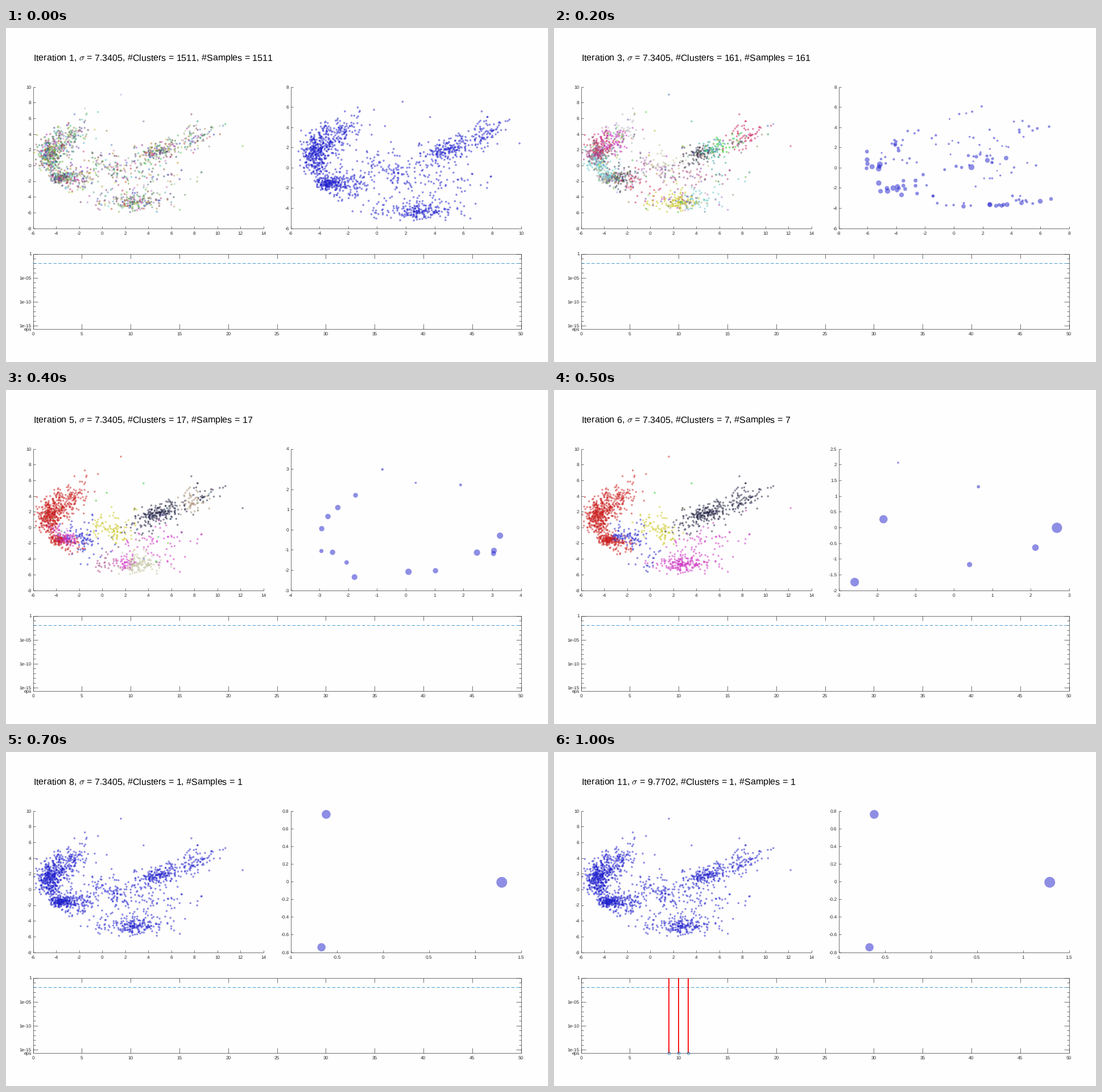
These frames come from a looping animation (953 px wide and 588 px high, 1100 ms). A matplotlib script:

```python
import numpy as np
import matplotlib.pyplot as plt
from matplotlib.animation import FuncAnimation
from matplotlib.collections import LineCollection
from matplotlib.colors import to_rgb

W, H, DPI = 953, 588, 64
PX = 72 / DPI
INK, STEEL = "#262626", "#0072bd"
BLUE, RED, GREEN, NAVY = "#1f1fcd", "#cc1f1f", "#1fcc1f", "#1f1f42"
MAGENTA, YELLOW, DARK, GREY = "#cc2bbf", "#ccc71f", "#38333d", "#b3b3bd"
CYAN, TEAL, SAND, TAN = "#66c7c7", "#33a699", "#c2c29e", "#a6876b"
LILAC, MAUVE, CRIMSON, SKY = "#b373bf", "#a64080", "#cc1f59", "#2673bf"

plt.rcParams.update({"font.family": "Liberation Sans", "mathtext.fontset": "cm",
                     "text.hinting": "none"})
rng = np.random.default_rng(11)

# Panels in pixels: left, top, right, bottom
TOP, FLOOR = 103.5, 352.5
SCORES = (47.5, TOP, 452.5, FLOOR)
CENTRES = (500.5, TOP, 905.5, FLOOR)
LOG = (47.5, 397.5, 905.5, 529.5)
DECADE = (LOG[3] - LOG[1]) / 15.65

XS, YS = (-6, 14), (-8, 10)
# Limits of the right panel
VIEWS = [((-6, 10), (-6, 8)), ((-8, 10), (-6, 6)), ((-8, 8), (-6, 8)), ((-6, 6), (-4, 6)),
         ((-4, 4), (-3, 4)), ((-3, 3), (-2, 2.5)), ((-1, 1.5), (-0.8, 0.8))]
COUNTS = [1511, 703, 161, 50, 17, 7, 3, 1]


def blob(n, cx, cy, sx, sy, slope=0.0):
    u, v = np.clip(rng.normal(size=(2, n)), -2.5, 2.5)
    return np.column_stack([cx + sx * u, cy + sy * v + slope * sx * u])


def make_cloud():
    far = [(1.63, 9), (12.2, 2.45), (10.5, 5.05), (10.7, 5.25), (-1.5, 7.25), (7.75, 6.5),
           (7.2, -3.75), (3.6, 5.6), (-2.4, 6.5), (8.6, -0.9), (0.4, 4.4)]
    pts = np.vstack([
        blob(250, -4.45, 1.5, 0.55, 0.85), blob(190, -3.8, 2.3, 0.9, 1, 0.5),
        blob(120, -2.8, 3.9, 1, 0.9, 0.3), blob(80, -4.5, 0.1, 0.5, 0.6, -0.6),
        blob(140, -3.6, -1.55, 0.45, 0.35), blob(210, -2.6, -1.8, 0.9, 0.65),
        blob(130, 4.9, 1.7, 0.8, 0.5, 0.25), blob(130, 5.2, 2, 1.8, 0.8, 0.45),
        blob(75, 8, 3.5, 0.95, 0.8, 0.4), blob(120, 2.5, -4.7, 0.9, 0.5),
        blob(120, 2.5, -4.5, 1.9, 0.7), blob(130, 0.5, -0.4, 1.4, 1.4),
        blob(105, 3.8, -1.4, 2.2, 1.2)])
    x, y = pts.T
    rim = (x > -1) | (y > -1.25 * (x + 5.6) - 0.6)
    pts = pts[rim & (x > -5.95) & (y > -6.2)]
    rng.shuffle(pts)
    return np.vstack([far, pts])[:COUNTS[0]]


cloud = make_cloud()


def hues(n):
    return 0.14 + 0.7 * rng.random((n, 3))


def regions(seeds, jitter, stray=0.0):
    """Colour every sample by the nearest seed, with blurred borders."""
    at = np.array([s[:2] for s in seeds])
    tint = np.array([to_rgb(s[2]) for s in seeds])
    p = cloud + rng.normal(0, jitter, cloud.shape)
    out = tint[((p[:, None] - at) ** 2).sum(2).argmin(1)]
    odd = rng.random(len(out)) < stray
    out[odd] = hues(odd.sum())
    return out


many = [(-3.2, 3, MAGENTA), (-4.6, 1.6, MAUVE), (-4.4, 2.4, CRIMSON), (-4.7, 0, CYAN),
        (-3.8, -1.1, CYAN), (-3.6, -1.8, GREY), (-2.3, -1.8, DARK), (-1.4, -2, CRIMSON),
        (-1.5, 4.7, GREY), (0, -0.5, LILAC), (1.2, 0.6, SAND), (1.8, -4.7, YELLOW),
        (5.3, -4.1, CYAN), (4.2, 1.4, DARK), (5.4, 2, TEAL), (6.4, 2.7, GREEN),
        (8, 3.5, CRIMSON), (4, -1.5, MAUVE)]
dozens = [(-4.4, 2, RED), (-5, 0.9, MAGENTA), (-4, 0.4, MAGENTA), (-3, 3.2, MAGENTA),
          (-3.6, 4.8, GREY), (-1.9, 4.8, SKY), (-2.6, -0.8, BLUE), (-3.7, -1.9, LILAC),
          (-1.7, -1.7, GREEN), (0.4, 1.8, SKY), (0.3, -0.5, YELLOW), (3.3, 0.8, YELLOW),
          (5.4, 2, LILAC), (7, 2.8, TAN), (10, 4.8, TEAL), (7.5, -0.4, LILAC),
          (0.2, -4.4, MAUVE), (2.6, -4.7, SAND), (4.2, -1.6, TAN)]
seven = [(-4.3, 2, RED), (-4, -1.7, RED), (-2.4, -2.5, RED), (-2, 5, RED), (1.6, 9, RED),
         (-2, -0.8, BLUE), (-0.9, -2.5, BLUE), (-2, -4.5, BLUE), (0.4, -0.6, YELLOW),
         (1.2, 1.7, YELLOW), (1.5, 5, GREEN), (3.4, 0.9, NAVY), (6, 2.4, NAVY),
         (9, 4.2, NAVY), (2.2, -4.4, MAGENTA), (5, -1.8, MAGENTA), (10, 0, MAGENTA)]
teens = seven + [(-3.2, -1.4, MAGENTA), (8, 3.6, TAN), (2.6, -4.6, SAND), (0, -4.6, MAUVE)]
three = [(-3.5, 1, BLUE), (-2, -2, BLUE), (-2, 5, BLUE), (3.2, 1.3, RED), (8, 3.6, RED),
         (1.6, -4.5, GREEN), (5, -2, GREEN)]

one = np.tile(to_rgb(BLUE), (len(cloud), 1))
tints = [hues(len(cloud)), hues(len(cloud)), regions(many, 0.55, 0.3),
         regions(dozens, 0.45, 0.08), regions(teens, 0.4, 0.03), regions(seven, 0.3),
         regions(three, 0.15), one]


def to_px(box, xs, ys, x, y):
    l, t, r, b = box
    return (l + (np.asarray(x) - xs[0]) / (xs[1] - xs[0]) * (r - l),
            b - (np.asarray(y) - ys[0]) / (ys[1] - ys[0]) * (b - t))


def samples():
    x, y = cloud.T
    px, py = to_px(CENTRES, *VIEWS[0], x - 0.00135 * x**3 + 0.15, y - 0.0034 * y**3)
    return np.column_stack([px, py, np.full(len(px), 1.8)])


def merged():
    x, y = cloud[11:11 + COUNTS[1]].T
    fall = np.where(x < 0, 0.7, 0.92)
    v = -fall * y - 0.1 + np.where(y < 0, 0.035 * y**2 + 0.1 * (x > 0), 0)
    px, py = to_px(CENTRES, *VIEWS[1], 0.94 * x - 0.9, np.minimum(v, 5.55))
    size = 1.6 + np.minimum(rng.exponential(0.45, len(px)), 1.5)
    return np.column_stack([px, py, size])


def trail(n, r, spread, *knots):
    """Dots of radius about r, scattered along a polyline."""
    k = np.array(knots, float)
    s = np.linspace(0, len(k) - 1, n)
    line = np.column_stack([np.interp(s, range(len(k)), c) for c in k.T])
    return np.column_stack([line + rng.normal(0, spread, (n, 2)),
                            r * rng.uniform(0.8, 1.2, n)])


def shrunk():
    big = [(734, 245, 5.2), (573, 240, 5), (762, 233, 4.2), (795, 229, 4), (855, 305, 4.3),
           (874, 301, 3.3), (822, 308, 3.9), (720, 314, 3.8), (571, 273, 4.7), (752, 138, 2)]
    return np.vstack([
        big, trail(7, 4.1, 3, (550, 222), (548, 248), (578, 244)),
        trail(9, 4, 4, (579, 287), (600, 280), (612, 286)),
        trail(6, 3, 5, (613, 266), (635, 287), (645, 264)),
        trail(5, 2.9, 2, (599, 195), (604, 217)),
        trail(7, 3.7, 2, (765, 310), (797, 312)),
        trail(9, 2.8, 6, (689, 248), (725, 232), (746, 215), (777, 234)),
        trail(4, 1.8, 2, (696, 157), (738, 148)),
        trail(12, 1.9, 8, (580, 212), (630, 180), (691, 200)),
        trail(8, 1.9, 4, (572, 232), (634, 233)),
        trail(9, 2.1, 5, (811, 168), (825, 184), (867, 169)),
        trail(12, 1.8, 7, (718, 197), (800, 206)),
        trail(12, 1.9, 9, (701, 240), (768, 227), (836, 244)),
        trail(6, 1.7, 6, (742, 272), (784, 260)),
        trail(8, 2.3, 4, (655, 283), (681, 305), (736, 310)),
        trail(8, 2.2, 3, (808, 297), (838, 311))])


def sparse():
    big = [(526, 258, 6.2), (535, 274, 6), (566, 308, 6.4), (585, 304, 5.2), (587, 319, 5),
           (545, 219, 4.8), (559, 220, 4), (515, 241, 3.9), (597, 195, 3.6), (789, 286, 6.5),
           (858, 327, 5.9), (776, 336, 5.7), (815, 338, 4.8), (757, 279, 4.4), (838, 302, 3.8),
           (828, 268, 3.3), (901, 185, 3.4), (888, 327, 3.2), (606, 319, 3.9), (653, 331, 3.9),
           (716, 329, 3), (772, 256, 3)]
    return np.vstack([
        big, trail(3, 2.3, 0, (657, 158), (704, 128)), trail(3, 1.9, 1, (605, 177), (624, 190)),
        trail(2, 2, 0, (683, 180), (699, 160)), trail(3, 1.8, 3, (787, 116), (787, 168)),
        trail(3, 2.3, 1, (621, 324), (650, 322)), trail(3, 2.2, 1, (573, 239), (545, 279)),
        trail(4, 2.4, 1, (882, 181), (868, 226), (880, 279)),
        trail(3, 2.2, 1, (764, 220), (827, 241))])


def handful():
    return np.vstack([trail(8, 4.4, 7, (600, 180), (545, 262), (610, 318)),
                      trail(6, 4.8, 7, (700, 325), (858, 300), (876, 248)),
                      trail(3, 2.2, 7, (655, 135), (795, 172))])


few = [(605, 128, 1.8), (746.3, 170.3, 2.9), (579.3, 227.5, 7.2), (884.3, 242.6, 9.1),
       (846.5, 277.4, 5.8), (730.7, 307.3, 4.6), (528.7, 338.2, 7.6)]
last = [(563, 109.8, 7.8), (871.7, 229.4, 9.5), (554.7, 343.8, 7.3)]
bubbles = [samples(), merged(), shrunk(), sparse(), handful(), few, last]

fig = plt.figure(figsize=(W / DPI, H / DPI), dpi=DPI, facecolor="#fefefe")
ax = fig.add_axes([0, 0, 1, 1])
ax.set(xlim=(0, W), ylim=(H, 0))
ax.axis("off")


def label(x, y, s, ha="center"):
    return ax.text(x, y + 3, s, size=8.3 * PX, color=INK, ha=ha, va="baseline")


def rules(segs):
    return ax.add_collection(LineCollection(segs, colors=INK, linewidths=0.65 * PX))


def ticks(lo, hi):
    step = next(s for s in (0.2, 0.5, 1, 2) if (hi - lo) / s < 10.5)
    return [round(lo + i * step, 6) + 0.0 for i in range(round((hi - lo) / step) + 1)]


def panel(box, xs, ys):
    l, t, r, b = box
    segs = [[(l, t), (l, b)], [(l, b), (r, b)]]
    made = []
    for v in ticks(*xs):
        x, _ = to_px(box, xs, ys, v, 0)
        segs.append([(x, b), (x, b - 4)])
        made.append(label(x, b + 8, f"{v:g}"))
    for v in ticks(*ys):
        _, y = to_px(box, xs, ys, 0, v)
        segs.append([(l, y), (l + 4, y)])
        made.append(label(l - 3, y, f"{v:g}", "right"))
    return made + [rules(segs)]


def log_panel():
    l, t, r, b = LOG
    segs = [[(l, t), (r, t)], [(r, t), (r, b)], [(r, b), (l, b)], [(l, b), (l, t)]]
    for v in range(0, 51, 5):
        x = l + v * (r - l) / 50
        segs += [[(x, b), (x, b - 8.5)], [(x, t), (x, t + 8.5)]]
        label(x, b + 8, str(v))
    for d in range(16):
        y = t + d * DECADE
        n = 4 if d % 5 else 8.5
        segs += [[(l, y), (l + n, y)], [(r, y), (r - n, y)]]
        if d % 5 == 0:
            label(l - 3, y, f"1e-{d:02d}" if d else "1", "right")
    label(l - 3, b, "eps", "right")
    rules(segs)
    y = t + 2 * DECADE
    ax.plot([l, r], [y, y], color=STEEL, lw=0.7 * PX, dashes=(8, 4.5))


def dots(xy, r, color):
    return ax.scatter(*xy, s=(2 * PX * np.asarray(r)) ** 2, c=color, alpha=0.5, linewidths=0)


cloud_px = to_px(SCORES, XS, YS, *cloud.T)
panel(SCORES, XS, YS)
log_panel()
live = []


def draw(i):
    while live:
        live.pop().remove()
    it, n = i + 1, COUNTS[min(i, 7)]
    sigma = 7.3405 * 1.1 ** max(0, it - 8)
    head = rf"Iteration {it}, $\sigma$ = {sigma:.4f}, #Clusters = {n}, #Samples = {n}"
    live.append(ax.text(47.5, 58, head, size=16 * PX, color="black", va="baseline"))
    live.append(dots(cloud_px, 1.75, tints[min(i, 7)]))
    k = min(i, 6)
    live.extend(panel(CENTRES, *VIEWS[k]))
    x, y, r = np.array(bubbles[k]).T
    live.append(dots((x, y), r, BLUE))
    for step in range(9, it + 1):
        x = LOG[0] + step * (LOG[2] - LOG[0]) / 50
        live.extend(ax.plot([x, x], [LOG[1], LOG[3]], color="red", lw=1.8 * PX,
                            solid_capstyle="butt"))
        live.extend(ax.plot([x], [LOG[3]], "o", ms=4.8 * PX, mfc="none", mec=STEEL,
                            mew=0.7 * PX))
    return live


anim = FuncAnimation(fig, draw, frames=11, interval=100, repeat=True, repeat_delay=0,
                     init_func=lambda: [], blit=False)
plt.show()
```
